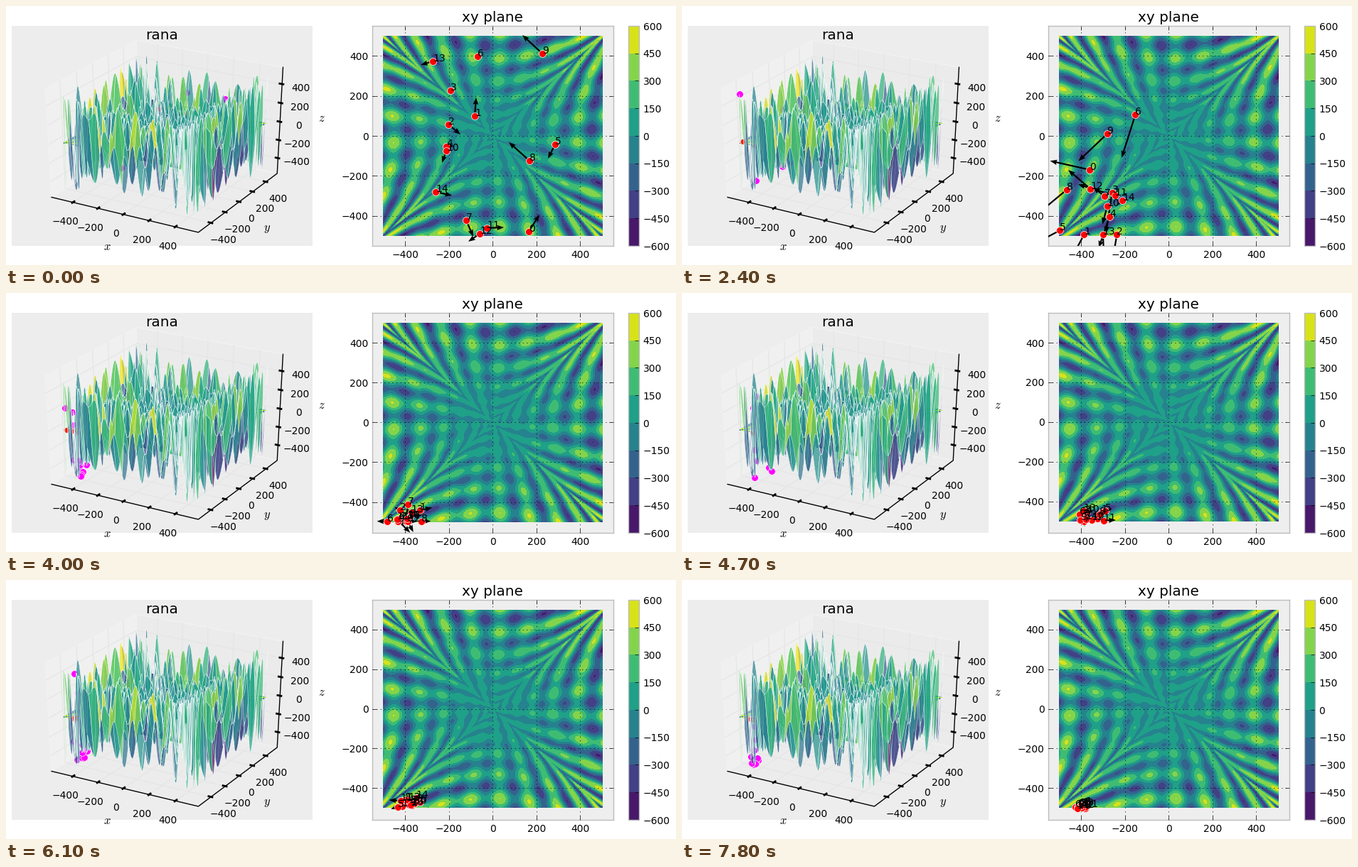
A matplotlib script for the animation above (8000 ms loop, 942 px wide and 365 px high).

```python
import numpy as np
import matplotlib.pyplot as plt
from matplotlib.animation import FuncAnimation
from matplotlib.collections import PolyCollection

WIDTH, HEIGHT, DPI = 942, 365, 100
INTERVAL, LOOP = 100, 8000
LEFT, RIGHT, TOP, BOTTOM = 515, 853.5, 28, 338      # xy plane panel
BOX = (8, 28, 423, 310)                             # 3D panel: x, y, w, h
DOMAIN, LIM = 500, 550
EDGE = LIM * 25 / 24
TICKS = range(-400, 401, 200)
LEVELS = np.arange(-600, 601, 150)

# times of the swarm's steps in ms: even at first, then a little faster
STEPS = np.r_[0, 1500, 2000:4001:400, 100 * np.round(40 + 3.44 * np.arange(1, 12))]

# starting swarm in stage pixels: x, y, dx, dy
START = np.array([
    (735, 318, 15, -24), (659, 155, 2, -26), (622, 167, 17, 14),
    (625, 119, 0, 0), (619, 198, 11, -1), (772, 195, -10, 20),
    (663, 71, 0, 0), (647, 302, 10, 23), (736, 218, -29, -26),
    (754, 67, -28, -26), (619, 204, -6, 17), (676, 313, 24, -1),
    (666, 321, -16, 11), (600, 78, -17, 5), (604, 262, 23, 5)], float)
INERTIA, MAX_PULL = 0.72, 0.66


def rana(x, y):
    a, b = np.sqrt(abs(y + 1 - x)), np.sqrt(abs(x + y + 1))
    return x * np.sin(a) * np.cos(b) + (y + 1) * np.cos(a) * np.sin(b)


def project(x, y, z):
    """Perspective view at azimuth -60, elevation 30: stage x, y and depth."""
    x, y, z = (np.asarray(c) / (2 * LIM) for c in (x, y, z))
    c, s = np.cos(np.radians(30)), 0.5
    depth = 10 - (s * c * x - c * c * y + s * z)
    right = (c * x + s * y) / depth
    up = (-s * s * x + s * c * y + c * z) / depth
    left, top, w, h = BOX
    return (left + (right + 0.095) / 0.185 * w,
            top + h - (up + 0.095) / 0.185 * h, depth)


def best_spot(step):
    """Best place found so far, sliding into the minimum."""
    return np.array([np.interp(step, (0, 1, 4, 18), xs)
                     for xs in ((604, 606, 576, 561), (262, 264, 311, 319))])


def fly():
    """Particle swarm: each one keeps part of its speed and is pulled to the best."""
    rng = np.random.default_rng(7)
    pos, move = START[:, :2], START[:, 2:]
    path, moves = [pos], [move]
    for step in range(len(STEPS) - 1):
        pull = rng.uniform(0, MAX_PULL, (len(START), 1))
        target = pos + INERTIA * move + pull * (best_spot(step) - pos)
        target = np.clip(target, (531, 43), (838, 322))
        pos, move = target, target - pos
        path.append(pos)
        moves.append(move)
    return path, moves


def y_limits(step):
    """Autoscaled limits: the swarm soon probes slightly below the domain."""
    low = DOMAIN + np.clip(2.2 * (step - 5), 0, 10.5)
    margin = 0.05 * (DOMAIN + low)
    return -low - margin, DOMAIN + margin


def add_stage(**kwargs):
    ax = fig.add_axes([0, 0, 1, 1], **kwargs)
    ax.set(xlim=(0, WIDTH), ylim=(HEIGHT, 0))
    ax.axis("off")
    return ax


def panel(left, right, **kwargs):
    return fig.add_axes([left / WIDTH, 1 - BOTTOM / HEIGHT,
                         (right - left) / WIDTH, (BOTTOM - TOP) / HEIGHT], **kwargs)


def capture():
    fig.canvas.draw()
    return np.array(fig.canvas.buffer_rgba())


def sample(count):
    line = np.linspace(-DOMAIN, DOMAIN, count)
    x, y = np.meshgrid(line, line)
    return x, y, rana(x, y)


def draw_surface(ax, patches=20, stride=10):
    """Coarse patches whose rims follow the fine grid, leaving gaps between."""
    x, y, z = sample(patches * stride + 1)
    px, py, depth = project(x, y, z)

    def rims(a):
        blocks = [a[i:i + stride + 1, j:j + stride + 1]
                  for i in range(0, patches * stride, stride)
                  for j in range(0, patches * stride, stride)]
        return np.array([np.r_[b[0, :-1], b[:-1, -1], b[-1, :0:-1], b[:0:-1, 0]]
                         for b in blocks])

    order = np.argsort(-rims(depth).mean(1))
    shade = plt.Normalize()(rims(z).mean(1)[order])
    ax.add_collection(PolyCollection(
        np.stack([rims(px), rims(py)], -1)[order],
        facecolors=plt.cm.viridis(shade, alpha=0.7),
        edgecolors=(1, 1, 1, 0.7), linewidths=0.4))


def draw_box(ax):
    left, top, w, h = BOX
    ax.add_patch(plt.Rectangle((left, top), w, h, color="#ededed", lw=0))

    def line(points, **style):
        px, py, _ = project(*np.array(points, float).T)
        ax.plot(px, py, **style)

    e = EDGE
    panes = (([(-e, -e, -e), (-e, e, -e), (-e, e, e), (-e, -e, e)], "#f0f0f0"),
             ([(-e, e, -e), (e, e, -e), (e, e, e), (-e, e, e)], "#ebebeb"),
             ([(-e, -e, -e), (e, -e, -e), (e, e, -e), (-e, e, -e)], "#ececec"))
    for corners, color in panes:
        px, py, _ = project(*np.array(corners).T)
        ax.fill(px, py, fc=color, ec="#f2f2f2", lw=1)
    for t in TICKS:
        for points in ([(t, -e, -e), (t, e, -e), (t, e, e)],
                       [(e, t, -e), (-e, t, -e), (-e, t, e)],
                       [(-e, -e, t), (-e, e, t), (e, e, t)]):
            line(points, color="#e5e5e5", lw=0.8)
    line([(-e, -e, -e), (e, -e, -e), (e, e, -e), (e, e, e)], color="k", lw=1)

    out, inn = e + 9, e - 18
    for t in TICKS:
        marks = (([(t, -out, -e), (t, -inn, -e)], (t, -e, -e), (-10.5, 27.5)),
                 ([(out, t, -e), (inn, t, -e)], (e, t, -e), (17, 24.5)),
                 ([(out, e, t), (inn, e, t)], (e, e, t), (26, 6)))
        for ends, anchor, (dx, dy) in marks:
            line(ends, color="k", lw=2, solid_capstyle="projecting")
            px, py, _ = project(*anchor)
            ax.text(px + dx, py + dy, f"{t}".replace("-", "\u2212"),
                    ha="center", va="center", size=10)
    for name, px, py in (("x", 142, 339), ("y", 367, 313), ("z", 444, 158)):
        ax.text(px, py, f"${name}$", size=12, math_fontfamily="cm",
                ha="center", va="center")
    ax.text(219.5, 47, "rana", size=14.4, ha="center")
    ax.text(684.3, 22, "xy plane", size=14.4, ha="center")


def draw_plane():
    x, y, z = sample(301)
    px, py, _ = project(x, y, 0 * z)
    stage.contourf(px, py, z, LEVELS, cmap="viridis", zorder=3)

    ax = panel(LEFT, RIGHT, facecolor="#eeeeee")
    fill = ax.contourf(x, y, z, LEVELS, cmap="viridis")
    ax.set(xlim=(-LIM, LIM), xticks=TICKS, yticks=TICKS)
    ax.set_axisbelow(False)
    ax.grid(color="k", lw=0.5, ls=(0, (2, 6)))
    ax.tick_params(direction="in", length=4, width=0.5, pad=4, top=True, right=True)
    ax.spines[:].set(color="#bcbcbc", lw=1)

    bar = fig.colorbar(fill, cax=panel(875, 890), ticks=LEVELS)
    bar.outline.set(edgecolor="#bcbcbc", lw=1)
    bar.ax.tick_params(direction="in", length=4, width=0.5, pad=4)
    return ax


# The fixed layers are rendered once; only the particles are drawn live.
fig = plt.figure(figsize=((WIDTH + 1e-6) / DPI, (HEIGHT + 1e-6) / DPI),
                 dpi=DPI, facecolor="white")
fig.patch.set_visible(False)
draw_surface(add_stage())
surface = capture()

fig.clear()
fig.patch.set_visible(True)
stage = add_stage()
draw_box(stage)
plane = draw_plane()
stage.set(xlim=(0, WIDTH), ylim=(HEIGHT, 0))
backdrops = {}
for limits in {y_limits(step) for step in range(len(STEPS))}:
    plane.set_ylim(limits)
    backdrops[limits] = capture()

fig.clear()
backdrop = fig.figimage(backdrops[y_limits(0)], zorder=-1)
stage = add_stage(zorder=1)
fig.figimage(surface, zorder=2)
over = panel(LEFT, RIGHT, zorder=3)
over.set(xlim=(LEFT, RIGHT), ylim=(BOTTOM, TOP))
over.axis("off")

path, moves = fly()
dot = dict(ls="", marker="o", mec="white", mew=0.5)
shadows, = stage.plot([], [], mfc="red", ms=5.5, **dot)
heights, = stage.plot([], [], mfc="magenta", ms=7, **dot)
particles, = over.plot([], [], mfc="red", ms=7.2, zorder=4, **dot)
arrows = over.quiver(*path[0].T, *moves[0].T, angles="xy", scale_units="xy",
                     scale=1, units="dots", width=2.2, headwidth=3.4,
                     headlength=4.5, headaxislength=4, zorder=3)
labels = [over.text(0, 0, str(i), size=10, zorder=5) for i in range(len(START))]


def update(frame):
    step = np.searchsorted(STEPS, frame * INTERVAL, side="right") - 1
    y_min, y_max = y_limits(step)
    backdrop.set_data(backdrops[y_min, y_max])

    px, py = path[step].T
    particles.set_data(px, py)
    arrows.set_offsets(path[step])
    arrows.set_UVC(*moves[step].T)
    for label, pos in zip(labels, path[step]):
        label.set_position(pos)

    x = ((px - LEFT) / (RIGHT - LEFT) * 2 - 1) * LIM
    y = y_max - (py - TOP) / (BOTTOM - TOP) * (y_max - y_min)
    shadows.set_data(*project(x, y, 0 * x)[:2])
    heights.set_data(*project(x, y, rana(x, y))[:2])
    return [backdrop, shadows, heights, particles, arrows, *labels]


anim = FuncAnimation(fig, update, frames=LOOP // INTERVAL, interval=INTERVAL,
                     repeat=True, repeat_delay=0)
plt.show()
```
